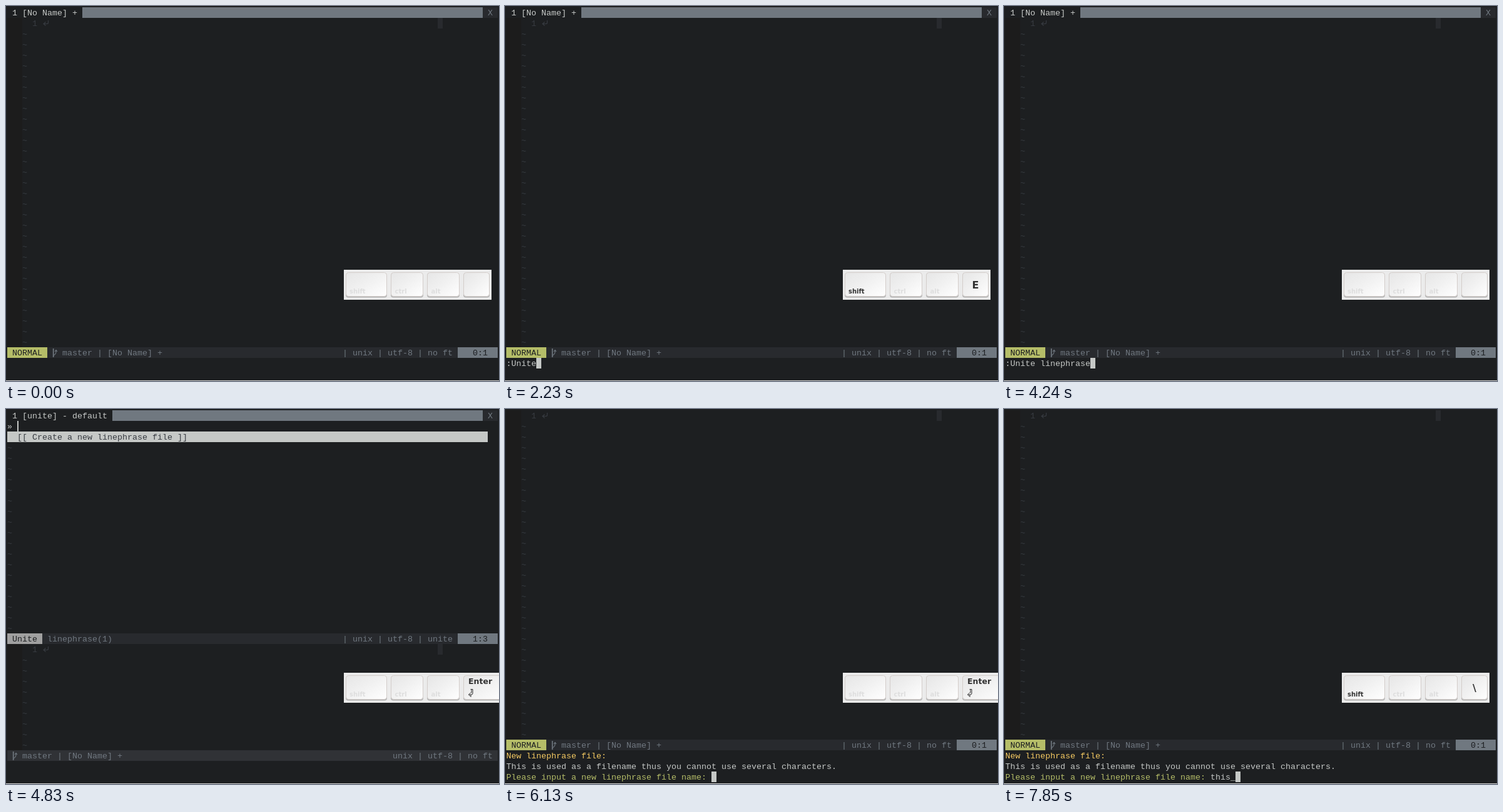
These frames come from a looping animation (788x600 px, 8 s). An HTML page:

```html
<!DOCTYPE html>
<html lang="en">
<head>
<meta charset="utf-8">
<title>Terminal session</title>
<style>
  html, body { margin: 0; width: 100%; height: 100%; overflow: hidden; background: #1d1f21; }
  svg { display: block; }
  text { white-space: pre; }
  .mono { font: 13.333px "Liberation Mono", monospace; }
  .key { font-family: "DejaVu Sans", sans-serif; font-weight: bold; }
</style>
</head>
<body>
<svg width="788" height="600" viewBox="0 0 788 600">
  <defs>
    <linearGradient id="cap" x1="0" y1="0" x2="1" y2="1">
      <stop offset="0" stop-color="#e6e6e6"/>
      <stop offset="0.45" stop-color="#f0f0f0"/>
      <stop offset="1" stop-color="#ffffff"/>
    </linearGradient>
  </defs>
  <g id="screen"></g>
  <g id="keys"></g>
</svg>
<script>
const LOOP = 8000, CW = 8, RH = 17, PAD = 2;
const BG = '#1d1f21', GUTTER = '#1c1c1c', BAR = '#282a2e', DIM = '#373b41',
      MID = '#707880', FG = '#c5c8c6', LIME = '#b5bd68', GOLD = '#f5ca62';

const COMMAND = ':Unite linephrase';
const COMMAND_AT = [950, 1590, 1840, 1930, 2150, 2190, 2330, 2500, 2620,
                    2880, 2980, 3090, 3260, 3300, 3410, 3650, 3690];
const NAME = 'this_';
const NAME_AT = [7330, 7430, 7470, 7600, 7810];
const KEYS = [
  [0, ''], [1630, 'U'], [1880, 'N'], [1970, 'I'], [2190, 'T'], [2230, 'E'],
  [2370, 'Space'], [2540, 'L'], [2660, 'I'], [2920, 'N'], [3020, 'E'],
  [3130, 'P'], [3300, 'H'], [3450, 'A'], [3690, 'S'], [3730, 'E'], [4240, ''],
  [4660, 'Enter'], [5160, ''], [6090, 'Enter'], [6640, ''], [7370, 'T'],
  [7470, 'H'], [7510, 'I'], [7640, 'S'], [7850, '\\']
];

const within = (t, a, b) => t >= a && t < b;
const typed = (text, times, t) => text.slice(0, times.filter(at => at <= t).length);
const colX = c => PAD + c * CW;
const rowY = r => PAD + r * RH;
const escapeText = s => s.replace(/&/g, '&amp;').replace(/</g, '&lt;');

const rect = (x, y, w, h, fill, extra = '') =>
  `<rect x="${x}" y="${y}" width="${w}" height="${h}" fill="${fill}" ${extra}/>`;
const cells = (c, r, n, fill) => rect(colX(c), rowY(r), n * CW, RH, fill);
const mono = (c, r, s, fill) =>
  `<text class="mono" x="${colX(c)}" y="${rowY(r) + 13}" fill="${fill}">${escapeText(s)}</text>`;
const path = (d, x, y, stroke, width) =>
  `<path d="${d}" transform="translate(${x} ${y})" fill="none" stroke="${stroke}" stroke-width="${width}"/>`;

const returnMark = (r, color) =>
  path('M9.5 4V7.5Q9.5 9.5 7.5 9.5H2.5M5.5 6.5L2 9.5L5.5 12.5', colX(7), rowY(r), color, 1.2);
const branchMark = (c, r) =>
  path('M1.7 2V16', colX(c), rowY(r), MID, 1.7) +
  path('M2 13Q6 11 6 7V5M4 7L6 4.5L8 7', colX(c), rowY(r), MID, 1.1);

function tildes(c, from, to) {
  let out = '';
  for (let r = from; r <= to; r++) out += mono(c, r, '~', DIM);
  return out;
}

function tabline(label) {
  const n = label.length;
  return mono(0, 0, label, FG) + cells(n, 0, 95 - n, MID) +
    cells(95, 0, 3, BAR) + mono(96, 0, 'X', MID);
}

function buffer(top, last, cursor) {
  return rect(PAD, rowY(top), 24, (last - top + 1) * RH, GUTTER) +
    mono(5, top, '1', DIM) + cells(86, top, 1, BAR) +
    (cursor ? cells(7, top, 1, FG) : '') +
    returnMark(top, cursor ? BG : DIM) + tildes(3, top + 1, last);
}

function statusline(r, mode, color, left, type, pos) {
  const n = mode.length;
  return cells(0, r, 98, BAR) + cells(0, r, n, color) + mono(0, r, mode, BG) + left +
    mono(67, r, '| unix | utf-8 | ' + type, MID) +
    cells(90, r, 8, MID) + mono(93, r, pos, BG);
}

const normalStatus = r => statusline(r, ' NORMAL ', LIME,
  branchMark(9, r) + mono(11, r, 'master | [No Name] +', MID), 'no ft', '0:1');

function editScene(t) {
  const blink = within(t, 40, 420) || within(t, 670, 950);
  const cmd = t < 4620 ? typed(COMMAND, COMMAND_AT, t) : '';
  const block = cmd && !within(t, 4390, 4620);
  return tabline(' 1 [No Name] + ') + buffer(1, 31, blink) + normalStatus(32) +
    mono(0, 33, cmd, FG) + (block ? cells(cmd.length, 33, 1, FG) : '');
}

function uniteScene(t) {
  const bar = t >= 4830 && !within(t, 5490, 5740);
  return tabline(' 1 [unite] - default ') + mono(0, 1, '»', FG) +
    (bar ? rect(18, rowY(1), 2, RH, FG) : '') +
    cells(0, 2, 96, FG) + mono(2, 2, '[[ Create a new linephrase file ]]', DIM) +
    tildes(0, 3, 20) +
    statusline(21, ' Unite ', '#a0a0a0', mono(8, 21, 'linephrase(1)', MID), 'unite', '1:3') +
    buffer(22, 31, false) + cells(0, 32, 98, '#303236') +
    branchMark(1, 32) + mono(3, 32, 'master | [No Name] +', MID) +
    mono(77, 32, 'unix | utf-8 | no ft', MID);
}

function inputScene(t) {
  const prompt = 'Please input a new linephrase file name: ';
  const name = typed(NAME, NAME_AT, t);
  const block = !within(t, 6800, 7050);
  return buffer(0, 30, false) + normalStatus(31) +
    mono(0, 32, 'New linephrase file:', GOLD) +
    mono(0, 33, 'This is used as a filename thus you cannot use several characters.', FG) +
    mono(0, 34, prompt, LIME) + mono(prompt.length, 34, name, FG) +
    (block ? cells(prompt.length + name.length, 34, 1, FG) : '');
}

function drawScreen(t) {
  const scene = t < 4700 ? editScene : t < 6130 ? uniteScene : inputScene;
  return rect(0, 0, 788, 600, BG) + scene(t) + rect(0, 599, 788, 1, '#d8d8d8');
}

function keyCap(x, w) {
  return rect(x, 428, w, 38.5, '#b4b4b4', 'rx="4"') +
    rect(x + 0.5, 426.5, w - 1, 38, 'url(#cap)', 'rx="4" stroke="#d3cdca"');
}

const keyText = (x, y, size, s, fill, anchor = 'start') =>
  `<text class="key" x="${x}" y="${y}" font-size="${size}" fill="${fill}" text-anchor="${anchor}">${s}</text>`;

function drawKeys(t) {
  const label = KEYS.filter(k => k[0] <= t).pop()[1];
  const shift = within(t, 1410, 4240) || t >= 7810;
  const wide = label.length > 1;
  const dark = '#333333', faint = '#dedede';
  let out = rect(540, 422, wide ? 248 : 236, 48, '#ebebeb') +
    keyCap(543, 66) + keyCap(615, 52) + keyCap(673, 52) + keyCap(731, wide ? 70 : 42) +
    keyText(549, 460, 10, 'shift', shift ? dark : faint) +
    keyText(621.5, 460, 10, 'ctrl', faint) + keyText(679.5, 460, 10, 'alt', faint);
  if (wide) out += keyText(739, 440, 12.5, label, dark);
  else if (label) out += keyText(752, 452, 16, label, dark, 'middle');
  if (label === 'Enter')
    out += path('M4 .5H7.5V7Q7.5 9 5.5 9H1M4.5 5.5L1 9L4.5 12.5V9M5.5 1V6.5', 738.5, 448, dark, 1);
  return out;
}

const screenEl = document.getElementById('screen');
const keysEl = document.getElementById('keys');
const shown = new Map();

function put(el, markup) {
  if (shown.get(el) === markup) return;
  shown.set(el, markup);
  el.innerHTML = markup;
}

function render(t) {
  put(screenEl, drawScreen(t));
  put(keysEl, drawKeys(t));
}

let start = null;
function tick(now) {
  if (start === null) start = now;
  render((now - start) % LOOP);
  requestAnimationFrame(tick);
}
render(0);
requestAnimationFrame(tick);
</script>
</body>
</html>
```
